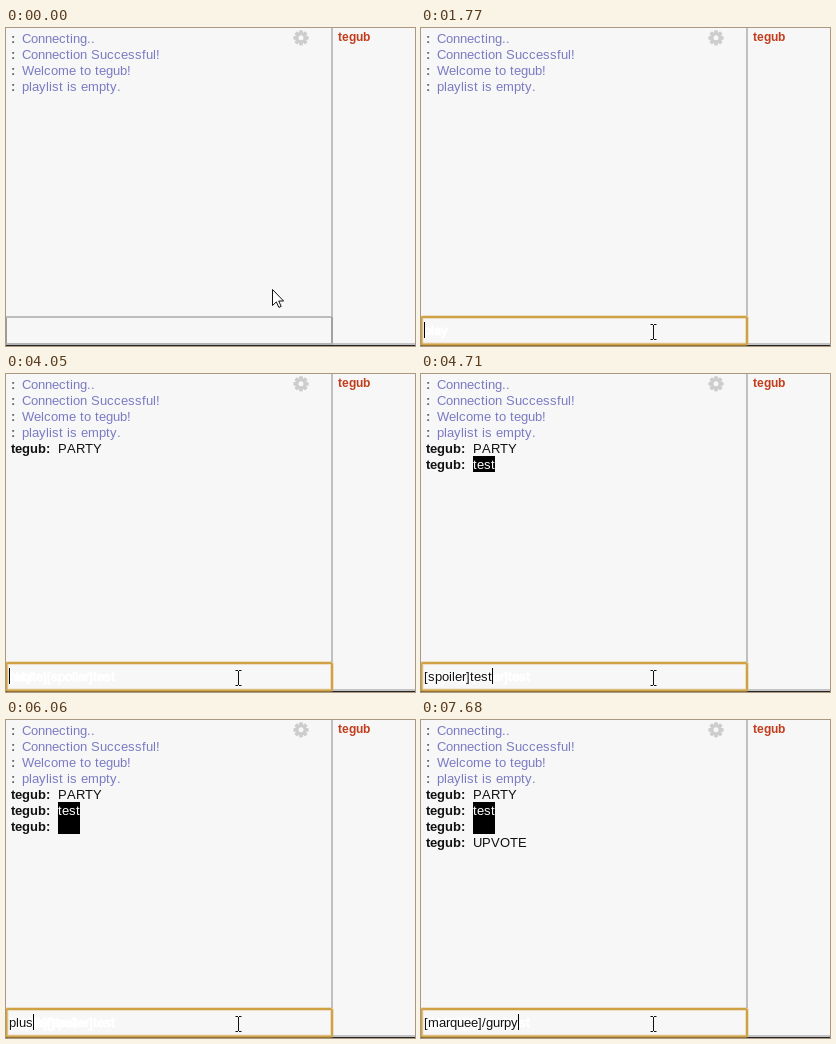
These frames come from a looping animation (409 by 318 pixels, 8000 ms). An HTML page:

```html
<!DOCTYPE html>
<html lang="en">
<head>
<meta charset="utf-8">
<title>Chat</title>
<style>
html, body { margin: 0; width: 100%; height: 100%; overflow: hidden; background: #f7f7f7; }
svg { display: block; font: 13px "Liberation Sans", Arial, sans-serif; }
.bold { font-weight: bold; }
</style>
</head>
<body>
<svg id="stage" width="409" height="318" viewBox="0 0 409 318"></svg>
<script>
const LOOP = 8000;
const USER = 'tegub';
const FAMILY = '"Liberation Sans", Arial, sans-serif';
const stage = document.getElementById('stage');
const pen = document.createElement('canvas').getContext('2d');

function add(tag, attrs, parent = stage) {
  const el = document.createElementNS('http://www.w3.org/2000/svg', tag);
  for (const key in attrs) el.setAttribute(key, attrs[key]);
  parent.appendChild(el);
  return el;
}

const rect = (x, y, width, height, fill, parent) =>
  add('rect', { x, y, width, height, fill }, parent);

// Whole-pixel advances, as in classic hinted screen text
function advances(text, x, size, bold) {
  pen.font = `${bold ? 'bold ' : ''}${size}px ${FAMILY}`;
  const xs = [x];
  for (const ch of text) xs.push(xs[xs.length - 1] + Math.round(pen.measureText(ch).width));
  return xs;
}

function write(text, x, y, fill, { size = 13, bold = false, parent = stage } = {}) {
  const xs = advances(text, x, size, bold);
  const el = add('text', { x: xs.slice(0, -1).join(' '), y, fill, 'font-size': size }, parent);
  if (bold) el.setAttribute('class', 'bold');
  el.textContent = text;
  return xs[xs.length - 1];
}

const group = () => add('g', {});
const show = (el, on) => el.setAttribute('visibility', on ? 'visible' : 'hidden');

// Page
rect(0, 0, 409, 318, '#f7f7f7');
rect(325, 0, 2, 288, '#c0c0c0');
rect(327, 315, 82, 2, '#c4c4c4');
rect(0, 317, 409, 1, '#252525');
write(USER, 332, 13, '#c23d1c', { size: 12, bold: true });

['Connecting..', 'Connection Successful!', `Welcome to ${USER}!`, 'playlist is empty.']
  .forEach((line, i) => {
    write(':', 5, 15 + 16 * i, '#666666', { bold: true });
    write(line, 16, 15 + 16 * i, '#7b7bc4');
  });

const gear = add('g', { transform: 'translate(295 9.8)', fill: '#cdcdcd' });
for (let i = 0; i < 4; i++) {
  add('rect', { x: -1.9, y: -7.6, width: 3.8, height: 15.2, rx: 0.8, transform: `rotate(${i * 45})` }, gear);
}
add('circle', { r: 5.7 }, gear);
add('circle', { r: 2.5, fill: '#f7f7f7' }, gear);

// Messages
const messages = [
  { at: 1920, text: 'PARTY', fill: '#111111' },
  { at: 4290, text: 'test', fill: '#ffffff', box: true },
  { at: 5610, text: 'test', fill: '#000000', box: true },
  { at: 7200, text: 'UPVOTE', fill: '#111111' }
].map((m, i) => {
  const g = group(), y = 79 + 16 * i;
  write(`${USER}:`, 5, y, '#111111', { bold: true, parent: g });
  if (m.box) {
    const width = advances(m.text, 0, 13).pop();
    rect(52, y - 13, width, 16, '#000000', g);
  }
  write(m.text, 52, y, m.fill, { parent: g });
  return { at: m.at, g };
});

// Input field
const plain = group();
rect(0, 288, 327, 2, '#bdbdbd', plain);
rect(0, 290, 1, 26, '#9c9c9c', plain);
rect(325, 289, 2, 27, '#a2a2a2', plain);
rect(0, 315, 327, 2, '#b4b4b4', plain);

const ring = group();
const frame = (width, opacity) => add('rect', {
  x: 0.5, y: 289, width: 325.5, height: 27.5, rx: 1.5, fill: 'none',
  stroke: '#d0a145', 'stroke-width': width, 'stroke-opacity': opacity
}, ring);
frame(4, 0.3);
frame(2, 1);

const entries = [
  { from: 1020, to: 1770, text: 'play' },
  { from: 2670, to: 4050, text: '[white][spoiler]test' },
  { from: 4710, to: 5460, text: '[spoiler]test' },
  { from: 6060, to: 6930, text: 'plus' },
  { from: 7680, to: LOOP, text: '[marquee]/gurpy' }
];
for (const e of entries) {
  e.trace = group();
  e.trace.setAttribute('stroke', '#ffffff');
  write(e.text, 3, 307, '#ffffff', { parent: e.trace });
}
for (const e of entries) {
  e.g = group();
  e.end = write(e.text, 3, 307, '#111111', { parent: e.g });
}
const caret = rect(3, 294, 1, 16, '#000000');

// Pointers
const arrow = add('path', {
  d: 'M.5 .5V16.5L4.3 12.9L6.9 18.4L9.2 17.4L6.7 12H11.6Z',
  fill: '#ffffff', stroke: '#111111', 'stroke-linejoin': 'round'
});
const beam = add('path', {
  d: 'M-3 -7.5H-.5M.5 -7.5H3M0 -7V7M-3 7.5H-.5M.5 7.5H3',
  fill: 'none', stroke: '#111111'
});
const path = [[266, 261], [260, 268], [252, 279], [244, 297], [237, 308], [233, 309], [232, 304]];

// The caret restarts its blink on every edit
const edits = [540, ...entries.flatMap(e => [e.from, e.to])];

function caretOn(t) {
  if (t < 540) return false;
  const last = Math.max(...edits.filter(at => at <= t));
  const age = t - last;
  return last === 540 || age < 480 || age >= 990;
}

function draw(t) {
  const step = t < 30 ? 0 : Math.min(6, Math.floor(t / 30));
  const [x, y] = path[step];
  const inField = step > 2;
  arrow.setAttribute('transform', `translate(${x} ${y})`);
  beam.setAttribute('transform', `translate(${x + 0.5} ${y})`);
  show(arrow, !inField);
  show(beam, inField);

  const focus = t < 330 ? 0 : Math.min(4, Math.floor((t - 330) / 70) + 1) / 4;
  ring.setAttribute('opacity', focus);
  plain.setAttribute('opacity', 1 - focus);

  let end = 3;
  for (const e of entries) {
    const typed = t >= e.from && t < e.to;
    if (typed) end = e.end;
    show(e.g, typed);
    show(e.trace, t >= e.to);
  }
  caret.setAttribute('x', end);
  show(caret, caretOn(t));
  for (const m of messages) show(m.g, t >= m.at);
}

const start = performance.now();
function tick() {
  draw((performance.now() - start) % LOOP);
  requestAnimationFrame(tick);
}
draw(0);
requestAnimationFrame(tick);
</script>
</body>
</html>
```
